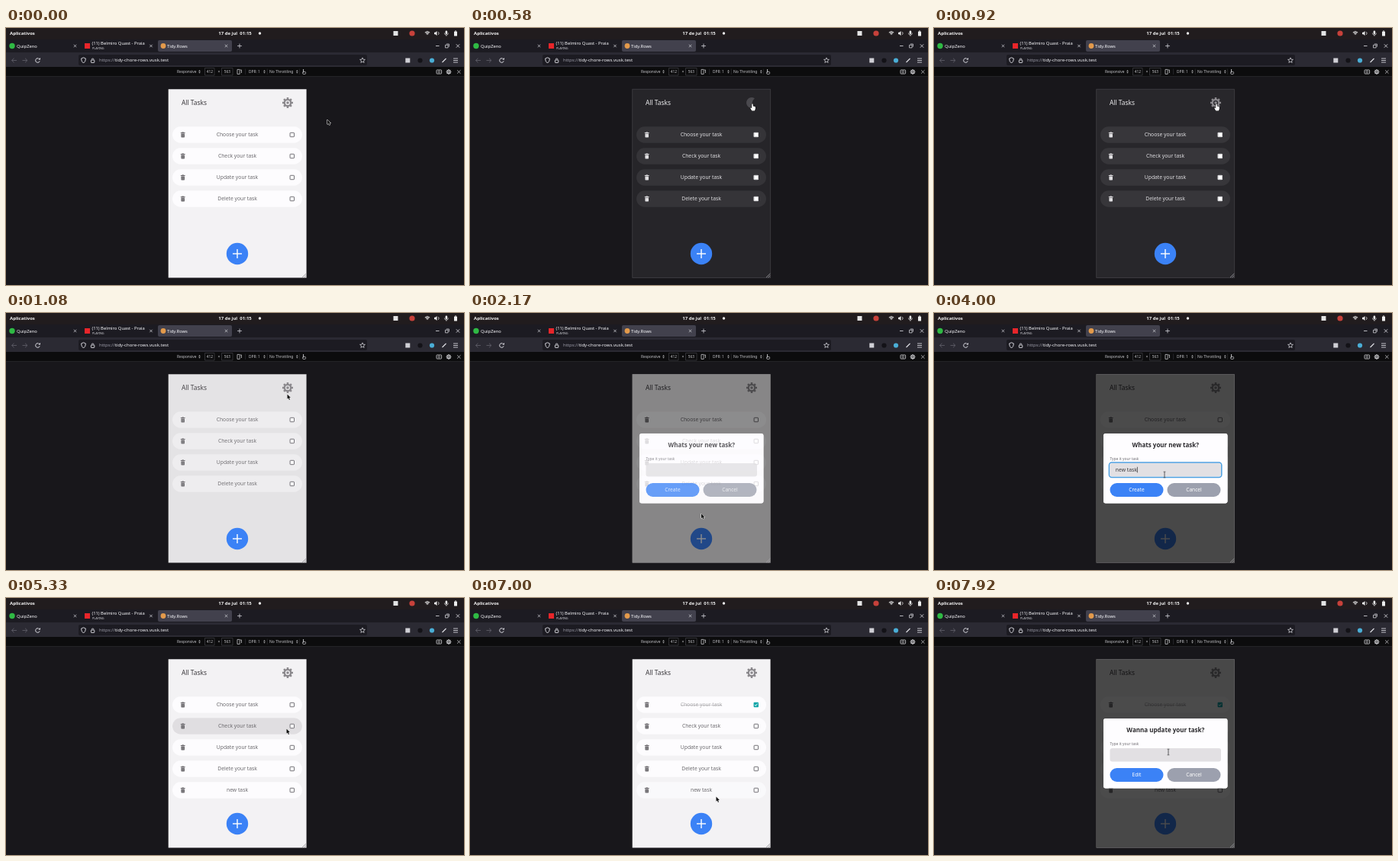
Write an HTML page with a canvas that moves like this. It is 600 by 337 pixels and loops after 8 s.

```html
<!DOCTYPE html>
<html lang="pt">
<head>
<meta charset="utf-8">
<title>Task list</title>
<style>
html, body { margin: 0; width: 100%; height: 100%; overflow: hidden; background: #18171b; }
canvas { display: block; width: 600px; height: 337px; }
</style>
</head>
<body>
<canvas id="stage"></canvas>
<script>
const W = 600, H = 337, LOOP = 8000;
const canvas = document.getElementById('stage');
const dpr = window.devicePixelRatio || 1;
canvas.width = W * dpr;
canvas.height = H * dpr;
const c = canvas.getContext('2d');

// time helpers
const ramp = (t, a, b) => Math.min(1, Math.max(0, (t - a) / (b - a)));
const ease = p => p * p * (3 - 2 * p);
const mix = (a, b, p) => `rgb(${a.map((v, i) => Math.round(v + (b[i] - v) * p))})`;

// drawing helpers
function box(x, y, w, h, fill, r = 0) {
  c.fillStyle = fill;
  c.beginPath();
  c.roundRect(x, y, w, h, r);
  c.fill();
}
function frame(x, y, w, h, color, lw = 1, r = 0) {
  c.strokeStyle = color;
  c.lineWidth = lw;
  c.beginPath();
  c.roundRect(x, y, w, h, r);
  c.stroke();
}
function dot(x, y, r, fill) {
  c.fillStyle = fill;
  c.beginPath();
  c.arc(x, y, r, 0, 7);
  c.fill();
}
function arc(x, y, r, color, lw = 1, a = 0, b = Math.PI * 2) {
  c.strokeStyle = color;
  c.lineWidth = lw;
  c.beginPath();
  c.arc(x, y, r, a, b);
  c.stroke();
}
function line(color, lw, ...p) {
  c.strokeStyle = color;
  c.lineWidth = lw;
  c.beginPath();
  for (let i = 0; i < p.length; i += 2) c.lineTo(p[i], p[i + 1]);
  c.stroke();
}
function poly(fill, ...p) {
  c.fillStyle = fill;
  c.beginPath();
  for (let i = 0; i < p.length; i += 2) c.lineTo(p[i], p[i + 1]);
  c.closePath();
  c.fill();
}
function text(s, x, y, size, color, weight = 400, align = 'left') {
  c.font = `${weight} ${size}px "Noto Sans", "Open Sans", sans-serif`;
  c.textAlign = align;
  c.fillStyle = color;
  c.fillText(s, x, y + size * 0.36);
  return c.measureText(s).width;
}
function cross(x, y, r, color, lw = 0.8) {
  line(color, lw, x - r, y - r, x + r, y + r);
  line(color, lw, x + r, y - r, x - r, y + r);
}
function plus(x, y, r, color, lw) {
  line(color, lw, x - r, y, x + r, y);
  line(color, lw, x, y - r, x, y + r);
}
function gear(x, y, r, color) {
  for (let i = 0; i < 8; i++) {
    const a = i * Math.PI / 4, dx = Math.cos(a), dy = Math.sin(a);
    line(color, r * 0.36, x + dx * r * 0.6, y + dy * r * 0.6, x + dx * r, y + dy * r);
  }
  arc(x, y, r * 0.6, color, r * 0.32);
  dot(x, y, r * 0.26, color);
}
function updown(x, y) {
  poly('#b1b1b3', x - 1.3, y - 0.5, x, y - 2.3, x + 1.3, y - 0.5);
  poly('#b1b1b3', x - 1.3, y + 0.5, x, y + 2.3, x + 1.3, y + 0.5);
}

function topBar() {
  box(0, 0, W, 15, '#211c1e');
  text('Aplicativos', 5, 7, 6, '#f2f2f2', 700);
  text('17 de jul  01:15', 300, 7, 6, '#f2f2f2', 700, 'center');
  dot(332.5, 7, 1.7, '#f2f2f2');
  box(507.5, 4, 6, 6, '#e4e4e4');
  dot(532, 7, 3.6, '#c8413a');
  for (const r of [1.6, 3.2, 4.8]) arc(552, 9.5, r, '#eee', 1, -2.3, -0.84);
  poly('#eee', 561, 5.8, 562.5, 5.8, 564.5, 4, 564.5, 10, 562.5, 8.2, 561, 8.2);
  arc(564.6, 7, 2.4, '#eee', 0.8, -0.9, 0.9);
  box(575.6, 3.5, 2.6, 4.6, '#eee', 1.3);
  arc(576.9, 6.6, 2.5, '#eee', 0.7, 0, Math.PI);
  line('#eee', 0.8, 576.9, 9, 576.9, 10.6);
  box(587, 4.4, 4, 6.2, '#eee', 0.6);
  box(588.1, 3.4, 1.8, 1.2, '#eee');
}

function tabs() {
  const ink = '#fbfbfe', dim = '#d0d0d6';
  box(0, 15, W, 17, '#1c1b22');
  box(199, 16, 97, 15, '#42414d', 2);
  dot(8, 23.5, 3.7, '#2fb944');
  text('QuipZeno', 14, 23.5, 5.8, ink);
  box(103, 20, 7, 7, '#e8252a');
  c.save();
  c.beginPath();
  c.rect(112, 15, 76, 17);
  c.clip();
  text('(11) Belmiro Quast - Praia', 112.5, 20.3, 5.8, ink);
  c.restore();
  text('PLAYING', 113, 27, 3.8, dim);
  dot(206, 23.5, 3.4, '#e39a4b');
  text('Tidy.Rows', 211, 23.5, 5.8, ink);
  for (const x of [90.5, 190, 288.5]) cross(x, 23.5, 1.7, dim);
  plus(306, 23.5, 2.9, dim, 0.8);
  // window controls
  line(dim, 0.9, 563, 23.5, 567.5, 23.5);
  frame(575.5, 22.3, 3.6, 3.6, dim, 0.8);
  line(dim, 0.8, 576.8, 21, 580.4, 21, 580.4, 24.6);
  cross(592, 23.5, 2.2, dim, 0.9);
}

function navBar() {
  const ink = '#e4e4ea', dim = '#5d5c66';
  box(0, 32, W, 19, '#2b2a33');
  line(dim, 0.9, 10.5, 39.7, 7.5, 42.5, 10.5, 45.3);
  line(dim, 0.9, 7.5, 42.5, 14, 42.5);
  line(dim, 0.9, 25, 39.7, 28, 42.5, 25, 45.3);
  line(dim, 0.9, 21.5, 42.5, 28, 42.5);
  arc(41.5, 42.5, 2.8, ink, 0.9, 0.3, 5.4);
  poly(ink, 42.4, 41.6, 45, 41.6, 45, 39);
  box(95, 35, 378, 14, '#1c1b22', 2);
  c.strokeStyle = ink;
  c.lineWidth = 0.9;
  c.beginPath();
  c.moveTo(101.5, 38.8);
  c.lineTo(104.4, 40);
  c.quadraticCurveTo(104.4, 44.4, 101.5, 46);
  c.quadraticCurveTo(98.6, 44.4, 98.6, 40);
  c.closePath();
  c.stroke();
  frame(111.4, 42, 4.4, 3.4, ink, 0.9, 0.6);
  arc(113.6, 41.4, 1.4, ink, 0.8, Math.PI, 0);
  const w = text('https://', 122, 42.3, 6, '#9a9aa6');
  text('tidy-chore-rows.vusk.test', 122 + w, 42.3, 6, '#f4f4f8');
  c.strokeStyle = ink;
  c.lineWidth = 0.7;
  c.beginPath();
  for (let i = 0; i < 10; i++) {
    const r = i % 2 ? 1.6 : 3.6, a = i * Math.PI / 5 - Math.PI / 2;
    c.lineTo(467 + r * Math.cos(a), 42.5 + r * Math.sin(a));
  }
  c.closePath();
  c.stroke();
  box(523.3, 39.5, 6, 6, '#d0d0d6');
  dot(542.5, 42.5, 3.1, '#131217');
  dot(558, 42.5, 3.1, '#4aaed6');
  line(ink, 1.1, 571.5, 45, 576.5, 40);
  for (const y of [40, 42.5, 45]) line(ink, 0.8, 586, y, 592, y);
}

function deviceBar() {
  const ink = '#c4c4c8';
  box(0, 51, W, 13, '#0c0c0d');
  box(0, 63.3, W, 0.7, '#2c2c30');
  text('Responsive', 224, 57, 4.8, ink);
  updown(253.5, 57.3);
  frame(260.5, 52.5, 12.5, 9.5, '#3c3c41', 0.8);
  text('412', 266.8, 57, 4.8, ink, 400, 'center');
  text('×', 279, 57, 5, ink, 400, 'center');
  frame(282.5, 52.5, 14.5, 9.5, '#3c3c41', 0.8);
  text('563', 289.8, 57, 4.8, ink, 400, 'center');
  frame(303, 54.4, 3.2, 6, ink, 0.8);
  line(ink, 0.8, 307, 55, 308.5, 55, 308.5, 59);
  text('DPR: 1', 318, 57, 4.8, ink);
  updown(338.5, 57.3);
  text('No Throttling', 345, 57, 5, ink);
  updown(381.3, 57.3);
  for (const x of [313.5, 342.3, 384.3]) line('#333338', 0.6, x, 53.5, x, 61);
  line(ink, 1, 389.6, 54, 389.6, 58.5);
  frame(388.6, 57.4, 4, 3, ink, 0.8, 1);
  frame(564, 55, 6.6, 5, ink, 0.9, 0.8);
  arc(567.3, 57.5, 1.2, ink, 0.8);
  gear(580, 57.5, 3.4, ink);
  cross(593.3, 57.5, 2.2, ink);
}

// the app
const ROWS = ['Choose your task', 'Check your task', 'Update your task', 'Delete your task', 'new task'];
const BLUE = '#3b82f6';
const SCREEN = [212.7, 80.3, 180.9, 247.2];
const PANEL = [222, 158, 162.5, 91.5];
const rowY = i => 140 + 28 * i;
const darkness = t => ease(ramp(t, 330, 560)) - ease(ramp(t, 910, 1115));
const createFade = t => ramp(t, 1960, 2290) - ramp(t, 4250, 4560);
const editFade = t => ramp(t, 7480, 7900);
const veil = t => createFade(t) + editFade(t);

const PATH = [
  [0, 421, 120], [80, 421, 120], [330, 370, 99.5], [920, 370, 99.5], [1080, 368.5, 106.5],
  [1650, 303, 292], [1960, 303, 290], [2170, 303, 263], [2580, 303, 255], [2800, 302, 209],
  [3420, 302, 209], [3750, 302, 212], [4000, 302, 212], [4200, 268, 232], [4400, 268, 232],
  [4830, 300, 280], [5250, 367.5, 171.5], [5400, 367.5, 171.5], [5660, 374, 140],
  [5950, 374, 140], [6420, 366, 226], [6900, 325, 270], [7330, 307, 202], [8000, 307, 202]
];
function pointer(t) {
  const i = Math.max(1, PATH.findIndex(k => k[0] > t));
  const [t0, x0, y0] = PATH[i - 1], [t1, x1, y1] = PATH[i];
  const p = ease(ramp(t, t0, t1));
  return [x0 + (x1 - x0) * p, y0 + (y1 - y0) * p];
}
// share of the last 120 ms that the pointer spent on a row
function hover(i, t) {
  let n = 0;
  for (let k = 0; k < 8; k++) {
    const s = Math.max(0, t - k * 15), [x, y] = pointer(s);
    if (veil(s) < 0.02 && x > 218 && x < 388 && Math.abs(y - rowY(i)) < 10.5) n++;
  }
  return n / 8;
}

function trash(x, y, color) {
  box(x - 2.9, y - 3, 5.8, 1.1, color);
  box(x - 1.1, y - 3.6, 2.2, 0.8, color);
  box(x - 2.3, y - 1.4, 4.6, 4.9, color, 0.7);
  for (const dx of [-0.8, 0.8]) line('rgba(255,255,255,.4)', 0.5, x + dx, y - 0.4, x + dx, y + 2.5);
}

function checkbox(x, y, dark, on) {
  if (on) {
    box(x - 3.2, y - 3.2, 6.4, 6.4, '#12a5a8', 1);
    line('#fff', 1, x - 1.8, y, x - 0.5, y + 1.4, x + 1.9, y - 1.5);
  } else {
    box(x - 3, y - 3, 6, 6, '#fff', 0.6);
    frame(x - 2.7, y - 2.7, 5.4, 5.4, dark ? '#c9c9cc' : '#737177', 1, 0.6);
  }
}

function row(i, t, d) {
  const y = rowY(i), h = hover(i, t), done = i === 0 && t >= 5700;
  const ink = mix([108, 106, 110], [222, 221, 224], d);
  box(218, y - 10.7, 170, 21.4, mix([253, 252, 254], [53, 52, 56], d), 10.7);
  if (h) {
    c.globalAlpha = h;
    box(218, y - 10.7, 170, 21.4, mix([224, 222, 225], [68, 67, 72], d), 10.7);
    c.globalAlpha = 1;
  }
  trash(231.7, y, ink);
  if (done) c.globalAlpha = 0.5;
  text(ROWS[i], 303, y, 6.75, ink, 400, 'center');
  if (done) line(ink, 0.6, 276, y + 0.6, 330, y + 0.6);
  c.globalAlpha = 1;
  checkbox(374.8, y, d > 0.5, done);
}

// dims the screen around the dialog
function shade(v) {
  c.fillStyle = `rgba(0,0,0,${0.7 * v})`;
  c.beginPath();
  c.rect(...SCREEN);
  c.roundRect(...PANEL, 3);
  c.fill('evenodd');
}

function app(t) {
  const d = darkness(t), v = veil(t), night = t >= 330 && t < 910;
  box(...SCREEN, mix([243, 242, 244], [38, 37, 41], d));
  if (d > 0) frame(...SCREEN, `rgba(66,65,70,${d})`, 0.8);
  text('All Tasks', 230, 98, 8.4, mix([58, 56, 60], [236, 236, 238], d));
  if (night) {
    c.fillStyle = '#4a494e';
    c.beginPath();
    c.arc(369, 98, 7, 1.0, 5.3);
    c.quadraticCurveTo(366.5, 98, 372.8, 103.9);
    c.fill();
  } else gear(369, 98, 7, '#8b898d');
  const count = t >= 4330 ? 5 : 4;
  for (let i = 0; i < count; i++) row(i, t, d);
  dot(303, 296, 14.2, BLUE);
  plus(303, 296, 6, '#fff', 1.4);
  if (v > 0) shade(v);
  for (const k of [0, 2.5, 5])
    line(v > 0.8 || d > 0.5 ? '#8c8b90' : '#a09ea3', 1, 388 + k, 327.2, 393.3, 322 + k);
}

function button(label, x, color) {
  box(x, 223, 70, 18, color, 9);
  text(label, x + 35, 232, 6.6, '#fff', 500, 'center');
}

function modal(t) {
  const edit = t >= 7480, v = veil(t);
  if (v <= 0) return;
  const focus = !edit && t >= 2790;
  c.globalAlpha = Math.min(1, v * 1.2);
  box(...PANEL, '#fefdff', 3);
  text(edit ? 'Wanna update your task?' : 'Whats your new task?', 303.3, 173.3, 8, '#2b2a2d', 600, 'center');
  text('Type it your task', 230.5, 191.3, 4.9, '#6f6d71');
  box(230.5, 197, 145.5, 17.5, '#e2e0e3', 3);
  if (focus) {
    frame(229.4, 196, 147.4, 19.5, '#4c9fe0', 1.5, 3.5);
    const keys = [3000, 3090, 3250, 3330, 3420, 3500, 3590, 3670];
    const typed = ROWS[4].slice(0, keys.filter(k => k <= t).length);
    const w = text(typed, 237.8, 205.6, 6.75, '#39383b');
    line('#222', 0.7, 238.4 + w, 201.8, 238.4 + w, 209.4);
  }
  button(edit ? 'Edit' : 'Create', 230.5, BLUE);
  button('Cancel', 305.5, '#9ca0ae');
  c.globalAlpha = 1;
}

function cursor(t) {
  const [x, y] = pointer(t), open = veil(t) > 0.5;
  const near = (cx, cy, r) => Math.hypot(x - cx, y - cy) < r;
  c.save();
  c.translate(x, y);
  c.lineJoin = 'round';
  if (open && x > 230 && x < 376 && y > 197 && y < 215) {
    line('#39383b', 0.8, 0, -3.6, 0, 3.6);
    line('#39383b', 0.7, -1.4, -3.8, 1.4, -3.8);
    line('#39383b', 0.7, -1.4, 3.8, 1.4, 3.8);
  } else if (open ? y > 223 && y < 241 : near(369, 98, 7.5) || near(303, 296, 14)) {
    const hand = [-0.8, 0, 0.6, 0, 0.8, 3, 3.8, 3.8, 4, 6, 3, 9, -0.8, 9, -2.8, 5.6, -2, 4.8, -0.8, 6];
    line('#111', 1.2, ...hand, -0.8, 0);
    poly('#fff', ...hand);
  } else {
    const arrow = [0, 0, 0, 7, 1.6, 5.6, 2.7, 8.2, 3.9, 7.7, 2.8, 5.2, 4.9, 5];
    c.scale(0.9, 0.9);
    line('#fff', 1.1, ...arrow, 0, 0);
    poly('#111', ...arrow);
  }
  c.restore();
}

function draw(t) {
  c.setTransform(dpr, 0, 0, dpr, 0, 0);
  c.globalAlpha = 1;
  box(0, 0, W, H, '#18171b');
  topBar();
  tabs();
  navBar();
  deviceBar();
  app(t);
  modal(t);
  cursor(t);
}

const start = performance.now();
function tick() {
  draw((performance.now() - start) % LOOP);
  requestAnimationFrame(tick);
}
tick();
</script>
</body>
</html>
```
